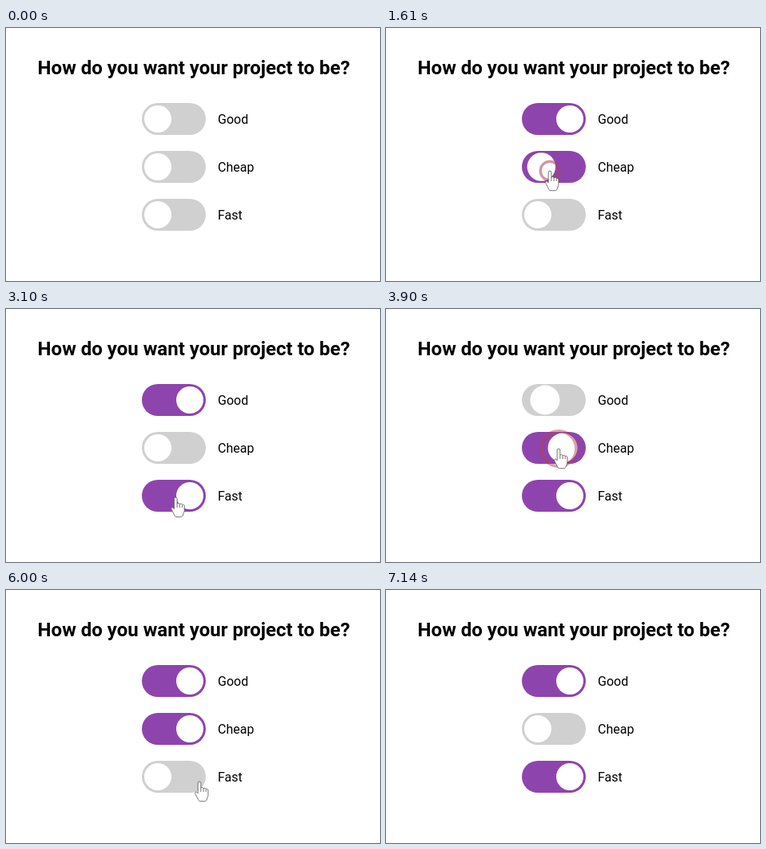
Recreate the animation shown at these times as an HTML page. Size 468 px wide and 317 px high, loop 7590 ms.

```html
<!DOCTYPE html>
<html lang="en">
<head>
<meta charset="utf-8">
<title>Good, cheap, fast</title>
<style>
  html, body { margin: 0; width: 100%; height: 100%; overflow: hidden; background: #fff; }
  svg { display: block; }
  text { font: 16px Roboto, sans-serif; }
  .title { font-weight: 700; font-size: 24px; text-anchor: middle; }
  #cursor path { fill: #fff; stroke: #555; stroke-width: .9; stroke-linejoin: round; }
</style>
</head>
<body>
<svg width="468" height="317" viewBox="0 0 468 317">
  <text class="title" x="235" y="58">How do you want your project to be?</text>
  <g id="rows"></g>
  <circle id="ripple" fill="none" stroke="#b04450"/>
  <g id="cursor">
    <path id="arrow" d="M0 0V19l4.5-4 3.2 7.6 3.2-1.4-3.2-7.4H13.5Z"/>
    <path id="hand" transform="scale(.92)" d="M-2 15V1a2 2 0 0 1 4 0V8c.6-1.3 3.2-1.3 3.6.4 1-1.1 3-.8 3.3.8 1.2-.9 3 0 3 1.8V17c0 3-1.6 4-1.8 6-.3 2-1.5 2.8-3.5 2.8H2c-2 0-3-.8-3.6-2.3C-3 20-6 16-6 14.5c0-2 2.5-2.2 4 .5ZM2 8v5M5.6 8.5V13M8.9 9.5V13"/>
  </g>
</svg>
<script>
const LOOP = 7590, TRAVEL = 200, SLIDE = 300, FADE = 400;
const TOP = 94, PITCH = 60, HEIGHT = 40;
const $ = id => document.getElementById(id);
const set = (el, attrs) => Object.entries(attrs).forEach(([k, v]) => el.setAttribute(k, v));
const clamp = v => Math.max(0, Math.min(1, v));
const ease = p => p * p * (3 - 2 * p);
const rowAt = y => Math.floor((y - TOP) / PITCH);

// Each move of the cursor: when it leaves, where it goes, when it clicks there
const moves = [
  { leave: -40, x: 260, y: 109 },
  { leave: 320, x: 221, y: 103, click: 760 },
  { leave: 767, x: 205, y: 180, click: 1570 },
  { leave: 2010, x: 212, y: 241, click: 2330 },
  { leave: 3070, x: 216, y: 176, click: 3660 },
  { leave: 4430, x: 218, y: 107, click: 5120 },
  { leave: 5800, x: 242, y: 241, click: 6540 },
  { leave: 6930, x: 258, y: 284 }
];
const clicks = moves.filter(m => m.click);

// Only two switches may be on: a third one turns the row before it off.
const changes = [[], [], []];
const on = [false, false, false];
for (const { click, y } of clicks) {
  const flip = i => {
    on[i] = !on[i];
    changes[i].push({ time: click + 8, active: on[i] });
  };
  flip(rowAt(y));
  if (on.every(Boolean)) flip((rowAt(y) + 2) % 3);
}

$('rows').innerHTML = ['Good', 'Cheap', 'Fast'].map((name, i) => `
  <g transform="translate(170 ${TOP + PITCH * i})">
    <rect width="80" height="${HEIGHT}" rx="20"/>
    <circle cy="20" fill="#fff"/>
    <text x="95" y="26">${name}</text>
  </g>`).join('');
const rows = [...$('rows').children];

function cursorAt(t) {
  let x = 306, y = 188;
  for (const m of moves) {
    const p = ease(clamp((t - m.leave) / TRAVEL));
    x += (m.x - x) * p;
    y += (m.y - y) * p;
  }
  return [x, y];
}

function drawSwitch(row, i, t) {
  const { time, active } = changes[i].findLast(c => c.time <= t) || { time: -SLIDE, active: false };
  const p = clamp((t - time) / SLIDE);
  const swell = 1 + 0.2 * (1 - Math.abs(2 * p - 1));
  const [track, knob] = row.children;
  set(track, { fill: active ? '#8e44ad' : '#d0d0d0' });
  set(knob, { cx: 20 + 40 * (active ? p : 1 - p), r: 17 * swell });
}

function drawRipple(t) {
  const { click, x, y } = clicks.findLast(c => c.click <= t) || { click: -LOOP, x: 0, y: 0 };
  const age = t - click, grow = clamp(age / 120);
  set($('ripple'), {
    cx: x, cy: y - 1,
    r: 6.5 + 15.5 * grow,
    'stroke-width': 3 + grow,
    opacity: (0.4 + 0.45 * grow) * clamp((FADE - age) / (FADE - 120))
  });
}

function drawCursor(t) {
  const [x, y] = cursorAt(t), row = rowAt(y);
  const hover = x > 170 && x < 250 && row >= 0 && row < 3 && (y - TOP) % PITCH < HEIGHT;
  const shown = t >= 40 && t < 7130;
  set($('cursor'), { transform: `translate(${x} ${y})`, display: shown ? 'inline' : 'none' });
  set($('hand'), { display: hover ? 'inline' : 'none' });
  set($('arrow'), { display: hover ? 'none' : 'inline' });
}

const start = performance.now();
function frame() {
  const t = (performance.now() - start) % LOOP;
  rows.forEach((row, i) => drawSwitch(row, i, t));
  drawRipple(t);
  drawCursor(t);
  requestAnimationFrame(frame);
}
frame();
</script>
</body>
</html>
```
